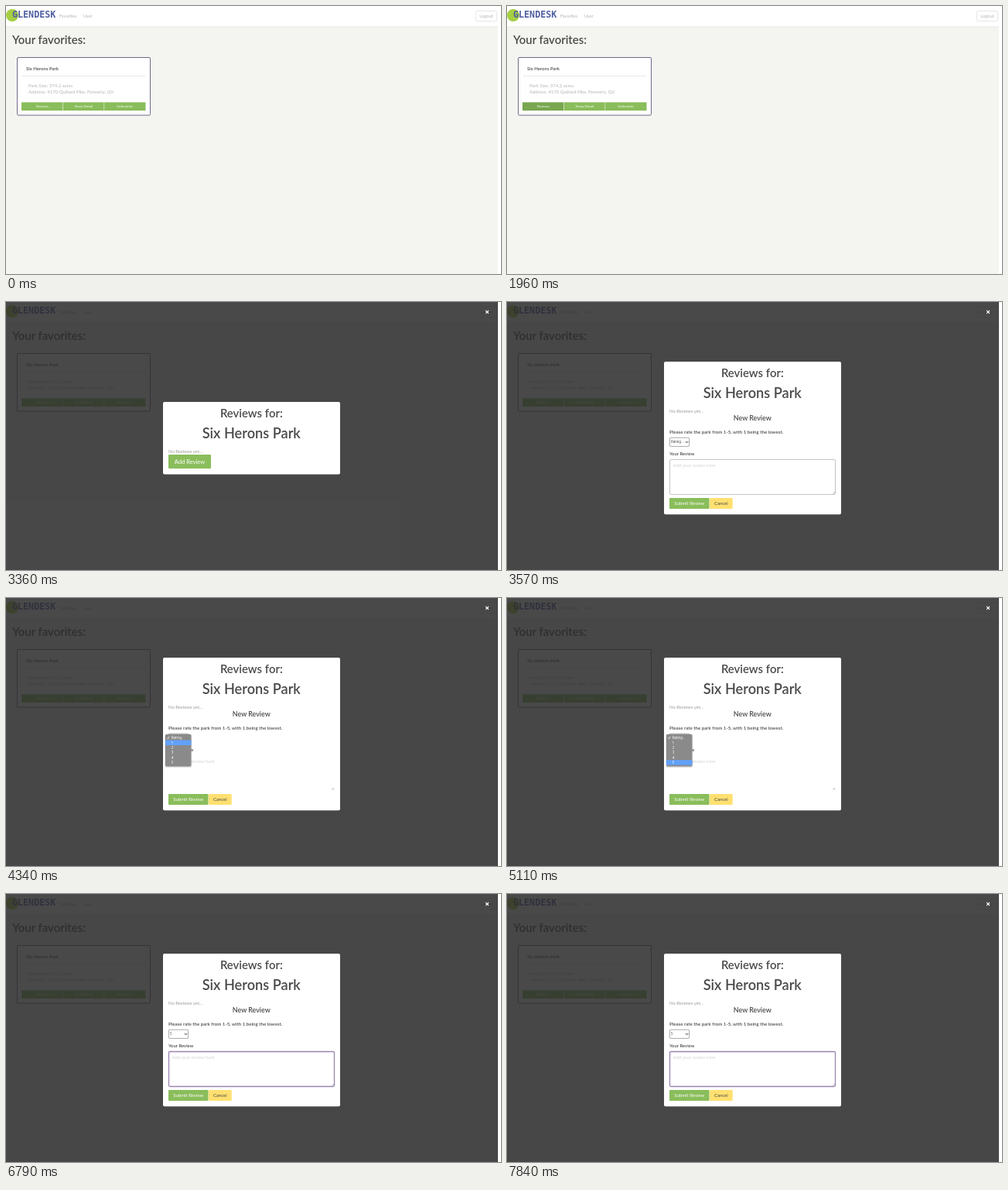
An HTML page that plays this animation: 640 by 346 pixels, repeating every 8000 ms.

```html
<!DOCTYPE html>
<html lang="en">
<head>
<meta charset="utf-8">
<title>Park reviews</title>
<style>
  html, body { margin: 0; width: 100%; height: 100%; overflow: hidden; background: #fff; }
  svg { display: block; width: 100vw; height: 100vh; font: 6px Lato, "Open Sans", sans-serif; fill: #4a4a4a; }
  .bold { font-weight: 600; }
  .mid { text-anchor: middle; }
  .faint { fill: #b4b4b4; }
  .green { fill: #8abd5b; }
  .hover { fill: #78a750; }
  .white { fill: #fff; }
  .small { font-size: 4.45px; }
  .nav { font-size: 5.7px; }
  .control { font: 4.4px Inter, sans-serif; }
  .wordmark { font: 700 11.7px "DejaVu Sans Mono", monospace; fill: #5060a0; }
  .box { fill: #fff; }
</style>
</head>
<body>
<svg viewBox="0 0 640 346">
  <g id="page">
    <rect width="636" height="346" fill="#f4f5f0"/>
    <rect width="636" height="26.5" class="white"/>
    <rect y="26.5" width="636" height="1" fill="#ebebe7"/>
    <circle cx="8" cy="12" r="8" fill="#a6cf42"/>
    <text x="8" y="14.6" class="wordmark">GLENDESK</text>
    <g class="faint nav">
      <text x="69" y="15">Favorites</text>
      <text x="100" y="15">User</text>
      <rect x="607.5" y="6.5" width="27" height="13" rx="1" fill="#fff" stroke="#e6e6e6"/>
      <text x="621" y="15" class="mid">Logout</text>
    </g>
    <text x="8" y="48.5" class="bold" font-size="14.9">Your favorites:</text>

    <rect x="14.5" y="66.5" width="172" height="74.5" rx="1.5" fill="#fff" stroke="#73688a"/>
    <text x="26" y="83" class="bold">Six Herons Park</text>
    <rect x="21" y="90" width="159" height="1" fill="#e8e8e8"/>
    <g class="faint">
      <text x="29" y="104.5">Park Size: 374.2 acres</text>
      <text x="29" y="113">Address: 4170 Quillard Pike, Fennerly, QV</text>
    </g>
    <g id="actions" class="green">
      <rect x="20" y="124.3" width="53.2" height="10.7"/>
      <rect x="73.7" y="124.3" width="52.9" height="10.7"/>
      <rect x="127.1" y="124.3" width="53.4" height="10.7"/>
    </g>
    <g class="white mid small">
      <text x="47" y="131.2">Reviews</text>
      <text x="100.3" y="131.2">Show Detail</text>
      <text x="153.5" y="131.2">Unfavorite</text>
    </g>
  </g>

  <g id="modal">
    <rect width="636" height="346" fill="#2a2a2a" fill-opacity=".85"/>
    <path d="M620.2 11l3.8 3.8m0-3.8l-3.8 3.8" stroke="#fff" stroke-width="1.1"/>
    <rect id="panel" x="203" width="229" rx="2" class="white"/>
    <g id="heading">
      <text x="317.3" y="149" class="bold mid" font-size="14.9">Reviews for:</text>
      <text x="317.3" y="176.4" class="bold mid" font-size="18.2">Six Herons Park</text>
      <text x="210" y="194.8" font-size="5.9" fill="#999">No Reviews yet...</text>
    </g>
    <g id="addButton">
      <rect x="210" y="197" width="55" height="18" rx="1" class="green"/>
      <text x="237.5" y="208.5" class="white mid" font-size="7.6">Add Review</text>
    </g>

    <g id="form">
      <text x="317.3" y="152.8" class="bold mid" font-size="8.9">New Review</text>
      <text x="210" y="169.7" class="bold" font-size="6.15">Please rate the park from 1-5, with 1 being the lowest.</text>
      <rect id="select" x="210.5" y="175.2" width="25" height="11.2" rx=".6" class="box"/>
      <text id="rating" x="212" y="182.4" class="control"></text>
      <path d="M231 180l1.6 1.7 1.6-1.7" fill="none" stroke="#333"/>
      <text x="210" y="197.6" class="bold" font-size="5.95">Your Review</text>
      <rect id="review" x="210.5" y="203.5" width="214" height="45" rx="1.5" class="box"/>
      <text x="214.5" y="213.2" font-size="5.9" fill="#d2d2d2">Add your review here</text>
      <path d="M421.5 247.5l2.5-2.5m-1 2.5l1-1" stroke="#888" stroke-width=".6"/>
      <rect id="caret" x="214.5" y="207.5" width=".7" height="7.5" fill="#333"/>
      <rect x="210" y="253" width="51.5" height="14" rx="1" class="green"/>
      <text x="235.8" y="262" class="white mid">Submit Review</text>
      <rect x="262" y="253" width="29.7" height="14" rx="1" fill="#ffe070"/>
      <text x="276.8" y="262" class="mid">Cancel</text>
    </g>

    <g id="menu">
      <rect x="205" y="176" width="35.5" height="43" rx="2.5" fill="#000" fill-opacity=".12"/>
      <rect x="206" y="175.8" width="33.4" height="41.6" rx="2" fill="#8a8a8a"/>
      <rect id="highlight" x="206" width="33.4" height="6.5" fill="#62a1fa"/>
      <path d="M208.3 180.6l1.1 1.4 1.8-3.4" fill="none" stroke="#fff" stroke-width=".7"/>
      <g id="options" class="white control"></g>
    </g>
  </g>
</svg>
<script>
  const LOOP = 8000;
  const ROW = 6.4;
  const $ = id => document.getElementById(id);
  const show = (id, on) => { $(id).style.display = on ? "" : "none"; };
  const within = (t, from, to) => t >= from && t < to;
  // Value of the last [time, value] step already reached.
  const stepAt = (t, steps) => steps.reduce((value, [time, next]) => t >= time ? next : value, null);

  const hoverSteps = [[1680, 2], [1750, 1], [1890, 0], [2030, null]];
  const optionSteps = [[4340, 1], [4620, 2], [4760, 3], [4900, 4], [5110, 5], [5670, null], [5740, 5]];

  $("options").innerHTML = ["Rating...", 1, 2, 3, 4, 5]
    .map((label, i) => `<text x="213.8" y="${182.1 + i * ROW}">${label}</text>`).join("");

  function border(id, color, width) {
    $(id).style.stroke = color;
    $(id).style.strokeWidth = width;
  }

  function render(t) {
    const open = t >= 2030;
    const form = t >= 3570;
    const rated = t >= 5880;
    const writing = t >= 6300;

    const hovered = stepAt(t, hoverSteps);
    [...$("actions").children].forEach((button, i) =>
      button.setAttribute("class", i === hovered ? "hover" : "green"));

    show("modal", open);
    show("addButton", !form);
    show("form", form);
    $("panel").setAttribute("y", form ? 77 : 129);
    $("panel").setAttribute("height", form ? 197.2 : 93.4);
    $("heading").setAttribute("transform", `translate(0 ${form ? -52 : 0})`);

    $("rating").textContent = rated ? "5" : "Rating...";
    const choosing = rated && !writing;
    border("select", choosing ? "#5d87a8" : "#aaa", choosing ? 1.4 : 1);
    if (writing) border("review", "#9a85b0", 1.3);
    else border("review", within(t, 3850, 5880) ? "none" : "#c4c4c4", 1);
    show("caret", within(t, 6300, 6790) || within(t, 7350, 7840));

    const option = stepAt(t, optionSteps);
    show("menu", within(t, 4340, 5880));
    $("menu").style.opacity = t < 5810 ? 1 : 0.5;
    show("highlight", option !== null);
    $("highlight").setAttribute("y", 177.2 + (option || 0) * ROW);
  }

  const start = performance.now();
  function frame() {
    render((performance.now() - start) % LOOP);
    requestAnimationFrame(frame);
  }
  frame();
</script>
</body>
</html>
```
